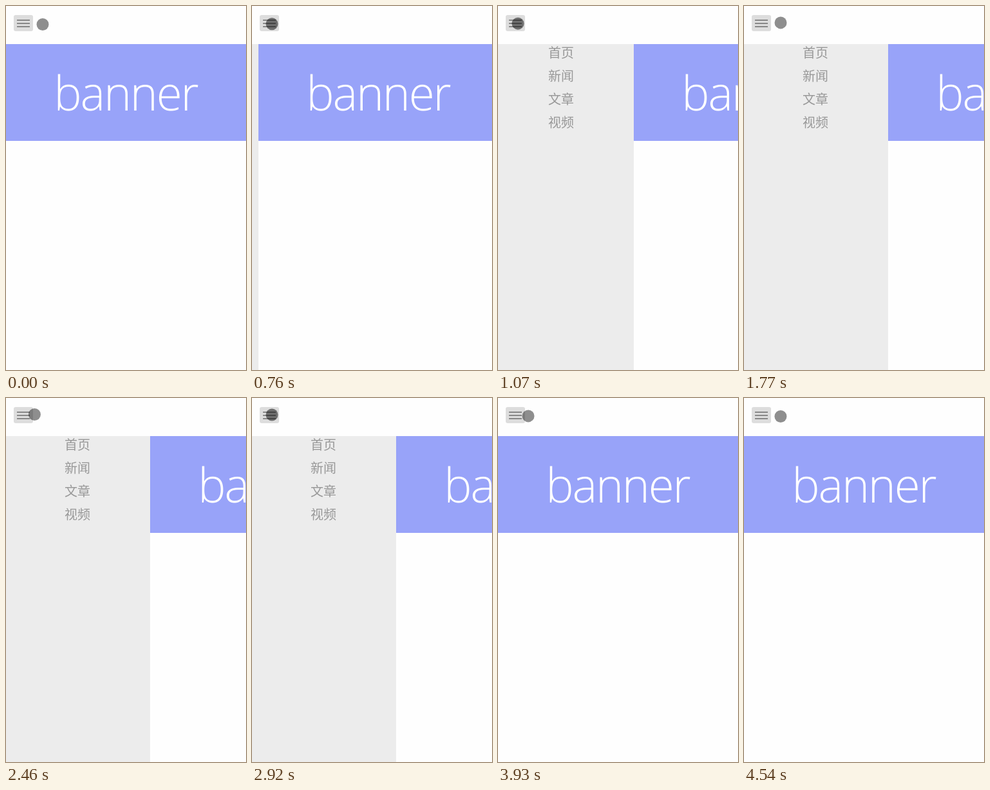
Recreate the animation shown at these times as an HTML page. Size 373 by 564 pixels, loop 4620 ms.

```html
<!DOCTYPE html>
<html lang="zh-CN">
<head>
<meta charset="utf-8">
<title>Side menu</title>
<style>
  html, body { margin: 0; width: 100%; height: 100%; overflow: hidden; background: #fefefe; }
  svg { display: block; width: 373px; height: 564px; }
  .title { font: 330 73px "Open Sans", "Noto Sans", sans-serif; letter-spacing: -2.2px; fill: #fff; text-anchor: middle; }
  .menu { font: 300 20px "Noto Sans CJK SC", "Noto Sans CJK", sans-serif; fill: #989898; }
</style>
</head>
<body>
<svg viewBox="0 0 373 564">
  <g id="page">
    <rect y="59" width="373" height="150" fill="#98a3f9"/>
    <text class="title" x="186" y="161.5">banner</text>
    <g transform="translate(-224 0)">
      <rect y="59" width="224" height="505" fill="#ececec"/>
      <text class="menu" y="79.5">
        <tspan x="91">首页</tspan>
        <tspan x="91" dy="36">新闻</tspan>
        <tspan x="91" dy="36">文章</tspan>
        <tspan x="91" dy="36">视频</tspan>
      </text>
    </g>
  </g>
  <rect x="12" y="14" width="30" height="25" rx="3" fill="#ddd"/>
  <path d="M17 22h20M17 27h20M17 32h20" stroke="#888" stroke-width="2"/>
  <circle id="pointer" r="9.5"/>
</svg>
<script>
const LOOP = 4620, STEPS = 60, STEP = LOOP / STEPS;
const MENU_WIDTH = 224, CLOSE_STEP = 42;
const BUTTON_X = 31, REST_X = 57;
const page = document.getElementById('page');
const pointer = document.getElementById('pointer');

// The CSS "ease" curve, cubic-bezier(.25, .1, .25, 1), between two steps.
function ease(step, from, to) {
  const progress = (step - from) / (to - from);
  if (progress <= 0) return 0;
  if (progress >= 1) return 1;
  const bezier = (s, a, b) => 3 * s * (1 - s) ** 2 * a + 3 * s * s * (1 - s) * b + s ** 3;
  let low = 0, high = 1;
  for (let i = 0; i < 24; i++) {
    const middle = (low + high) / 2;
    if (bezier(middle, .25, .25) < progress) low = middle; else high = middle;
  }
  return bezier(low, .1, 1);
}

function draw(time) {
  // The picture advances in even steps; the offset absorbs timer rounding.
  const step = Math.floor((time % LOOP + 14) / STEP);

  // The menu slides open with easing and closes at once.
  const shift = step < CLOSE_STEP ? Math.round(MENU_WIDTH * ease(step, 9.62, 15.85)) : 0;
  page.setAttribute('transform', `translate(${shift} 0)`);

  // The pointer goes to the button and back twice, drifting up and down once.
  const nearness = ease(step, 0, 5) - ease(step, 16, 23) + ease(step, 30, 37) - ease(step, 46, 60);
  const pressed = (step >= 10 && step < 16) || (step >= 38 && step < 47);
  pointer.setAttribute('cx', REST_X + (BUTTON_X - REST_X) * nearness);
  pointer.setAttribute('cy', 27 + 1.5 * Math.cos(2 * Math.PI * step / STEPS));
  pointer.setAttribute('fill-opacity', pressed ? .5 : .44);
}

const begin = performance.now();
function tick() {
  draw(performance.now() - begin);
  requestAnimationFrame(tick);
}
tick();
</script>
</body>
</html>
```
